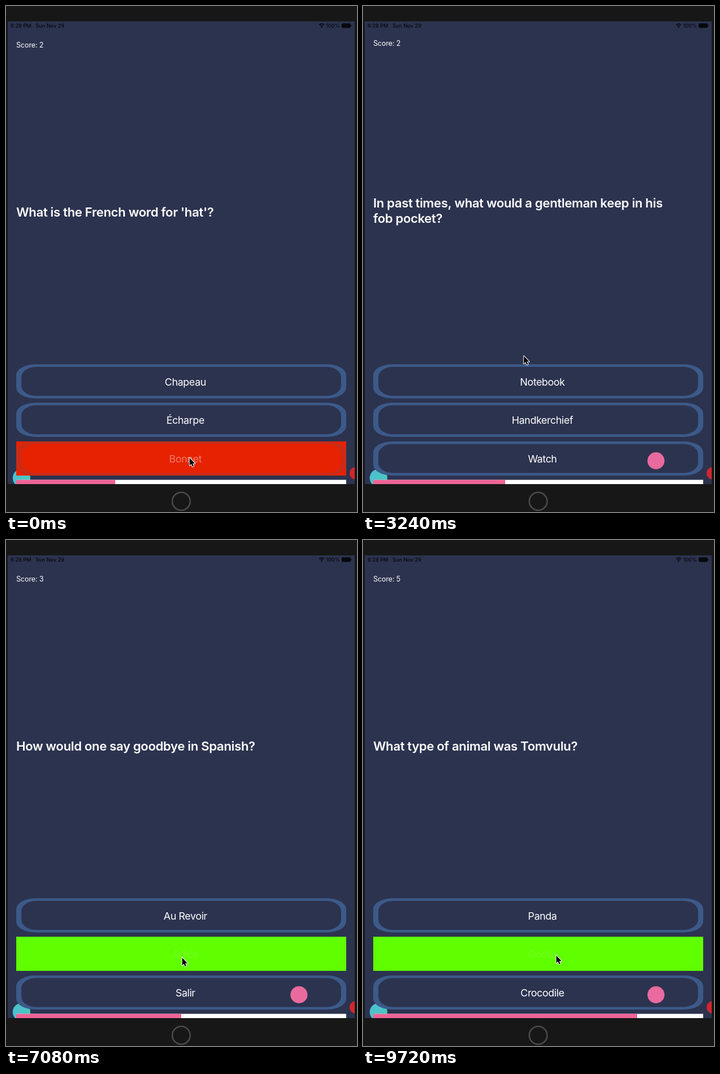
Recreate the animation shown at these times as an HTML page with a canvas. Size 617 by 889 pixels, loop 9760 ms.

```html
<!DOCTYPE html>
<html lang="en">
<head>
<meta charset="utf-8">
<title>Quiz</title>
<style>
html, body { margin: 0; width: 100%; height: 100%; overflow: hidden; background: #171717; }
canvas { display: block; }
</style>
</head>
<body>
<canvas id="stage" width="617" height="889"></canvas>
<script>
const ctx = document.getElementById('stage').getContext('2d');
const LOOP = 9760;
const FONT = 'Inter, Roboto, sans-serif';
const RED = '#e62200', GREEN = '#60ff00';
const BUTTON_TOPS = [629.5, 697, 765];

// Times in ms; the picked answer is held from press to release, then flashes until the next question.
const quiz = [
  { start: -900, score: 2, lines: ["What is the French word for 'hat'?"],
    answers: ['Chapeau', 'Écharpe', 'Bonnet'], pick: 2, press: -200, release: -120, flash: RED },
  { start: 120, score: 2, lines: ['In past times, what would a gentleman keep in his', 'fob pocket?'],
    answers: ['Notebook', 'Handkerchief', 'Watch'], pick: 2, press: 4080, release: 4160, flash: GREEN },
  { start: 4400, score: 3, lines: ['How would one say goodbye in Spanish?'],
    answers: ['Au Revoir', 'Adiós', 'Salir'], pick: 1, press: 6960, release: 7040, flash: GREEN },
  { start: 7280, score: 4, lines: ['Which of these colours is NOT featured in the logo', 'for Belvor?'],
    answers: ['Green', 'Orange', 'Blue'], pick: 0, press: 8470, release: 8600, flash: RED },
  { start: 8840, score: 4, lines: ['What alcoholic drink is made from molasses?'],
    answers: ['Rum', 'Whisky', 'Gin'], pick: 0, press: 8940, release: 9000, flash: GREEN },
  { start: 9240, score: 5, lines: ['What type of animal was Tomvulu?'],
    answers: ['Panda', 'Gorilla', 'Crocodile'], pick: 1, press: 9600, release: 9680, flash: GREEN }
];

// [time, x, y] of the pointer tip
const pointerPath = [
  [0, 322, 793], [240, 322, 793], [1000, 295, 388], [2760, 295, 388],
  [3240, 282, 614], [3840, 330, 793], [5040, 330, 793], [5640, 300, 460],
  [5900, 300, 460], [6760, 309, 733], [7360, 309, 733], [8000, 318, 650],
  [9180, 318, 650], [9520, 339, 729], [LOOP, 339, 729]
];

const clamp = v => Math.max(0, Math.min(1, v));
const smooth = v => v * v * (3 - 2 * v);

function rect(x, y, w, h, color) {
  ctx.fillStyle = color;
  ctx.fillRect(x, y, w, h);
}

function disc(x, y, r, fill) {
  ctx.beginPath();
  ctx.arc(x, y, r, 0, 7);
  ctx.fillStyle = fill;
  ctx.fill();
}

function text(str, x, y, size, { weight = 400, color = '#fff', align = 'left', spacing = 0 } = {}) {
  ctx.font = `${weight} ${size}px ${FONT}`;
  ctx.letterSpacing = spacing + 'px';
  ctx.textAlign = align;
  ctx.fillStyle = color;
  ctx.fillText(str, x, y);
}

function ovalRect(x, y, w, h, rx, ry) {
  const r = x + w, b = y + h, q = Math.PI / 2;
  ctx.moveTo(x + rx, y);
  ctx.ellipse(r - rx, y + ry, rx, ry, 0, -q, 0);
  ctx.ellipse(r - rx, b - ry, rx, ry, 0, 0, q);
  ctx.ellipse(x + rx, b - ry, rx, ry, 0, q, 2 * q);
  ctx.ellipse(x + rx, y + ry, rx, ry, 0, 2 * q, 3 * q);
  ctx.closePath();
}

function drawButton(top, label, textAlpha, frameAlpha, flash) {
  if (flash) rect(18, top, 580, 60, flash);
  ctx.globalAlpha = frameAlpha;
  ctx.beginPath();
  ovalRect(18, top, 580, 60, 34, 19);
  ovalRect(27, top + 4.5, 562, 51, 26, 18);
  ctx.fillStyle = '#3c5a89';
  ctx.fill('evenodd');
  ctx.globalAlpha = textAlpha;
  text(label, 315.3, top + 37, 17.8, { align: 'center', spacing: -0.42 });
  ctx.globalAlpha = 1;
}

function drawStatusBar() {
  const style = { weight: 500, color: '#07080c' };
  text('6:28 PM', 8, 38, 9.1, style);
  text('Sun Nov 29', 52, 38, 9.1, style);
  text('100%', 587, 38, 9.1, { ...style, align: 'right' });
  ctx.strokeStyle = '#07080c';
  ctx.lineWidth = 1.4;
  for (const r of [3.6, 6.2]) {
    ctx.beginPath();
    ctx.arc(554.8, 37.5, r, -Math.PI * 0.76, -Math.PI * 0.24);
    ctx.stroke();
  }
  disc(554.8, 37, 1.3, '#07080c');
  ctx.beginPath();
  ctx.roundRect(590, 30.5, 16, 8, 2);
  ctx.fillStyle = '#07080c';
  ctx.fill();
  rect(606.7, 33, 1, 3, '#07080c');
}

function drawBackdrop() {
  rect(0, 0, 617, 889, '#171717');
  rect(3, 27, 610, 813, '#2c334f');
  ctx.beginPath();
  ctx.arc(308, 870.3, 15.7, 0, 7);
  ctx.strokeStyle = '#4b4b4b';
  ctx.lineWidth = 2.5;
  ctx.stroke();
}

function drawCircles() {
  const teal = ctx.createLinearGradient(12, 818, 43, 838);
  teal.addColorStop(0, '#4cbfd2');
  teal.addColorStop(1, '#4cc9bd');
  disc(27.3, 829.3, 15.5, teal);
  disc(515, 799, 15, '#e96b9e');
  disc(615, 821, 11, '#d0272e');
}

function drawQuestion(t) {
  const index = quiz.findLastIndex(q => t >= q.start);
  const q = quiz[index];
  const twoLines = q.lines.length > 1;
  text('Score: ' + q.score, 18, twoLines ? 69.7 : 72.7, 12.5, { spacing: -0.15 });
  q.lines.forEach((line, i) =>
    text(line, 18, (twoLines ? 354 : 370) + i * 27, 22, { weight: 600, spacing: -0.35 }));

  const appear = clamp(0.15 + (t - q.start) / 240);
  q.answers.forEach((label, i) => {
    let alpha = 1, flash = null;
    if (i === q.pick && t >= q.release) {
      alpha = clamp(0.05 + 0.35 * ((t - q.release) / 120) ** 1.5);
      flash = q.flash;
    } else if (i === q.pick && t >= q.press) {
      alpha = Math.max(0.05, 1 - (t - q.press) / 60);
    }
    drawButton(BUTTON_TOPS[i], label, alpha * appear, alpha * alpha, flash);
  });

  rect(18, 832.5, 580, 7.5, '#fff');
  rect(18, 832.5, 58 * (index + 3), 7.5, '#ee6496');
}

function drawPointer(t) {
  const next = Math.max(1, pointerPath.findIndex(p => p[0] > t));
  const [t0, x0, y0] = pointerPath[next - 1];
  const [t1, x1, y1] = pointerPath[next];
  const k = smooth((t - t0) / (t1 - t0));
  ctx.save();
  ctx.translate(x0 + (x1 - x0) * k, y0 + (y1 - y0) * k);
  ctx.beginPath();
  [[0.7, 1], [0.7, 14.2], [3.7, 11.5], [5.8, 16.3], [8, 15.4], [6, 10.7], [10.1, 10.7]]
    .forEach(([x, y]) => ctx.lineTo(x, y));
  ctx.closePath();
  ctx.lineJoin = 'round';
  ctx.lineWidth = 2;
  ctx.strokeStyle = '#fff';
  ctx.stroke();
  ctx.fillStyle = '#000';
  ctx.fill();
  ctx.restore();
}

function draw(t) {
  drawBackdrop();
  drawStatusBar();
  ctx.save();
  ctx.beginPath();
  ctx.rect(3, 27, 610, 813);
  ctx.clip();
  drawCircles();
  drawQuestion(t);
  ctx.restore();
  drawPointer(t);
}

const began = performance.now();
function tick() {
  draw((performance.now() - began) % LOOP);
  requestAnimationFrame(tick);
}
tick();
</script>
</body>
</html>
```
